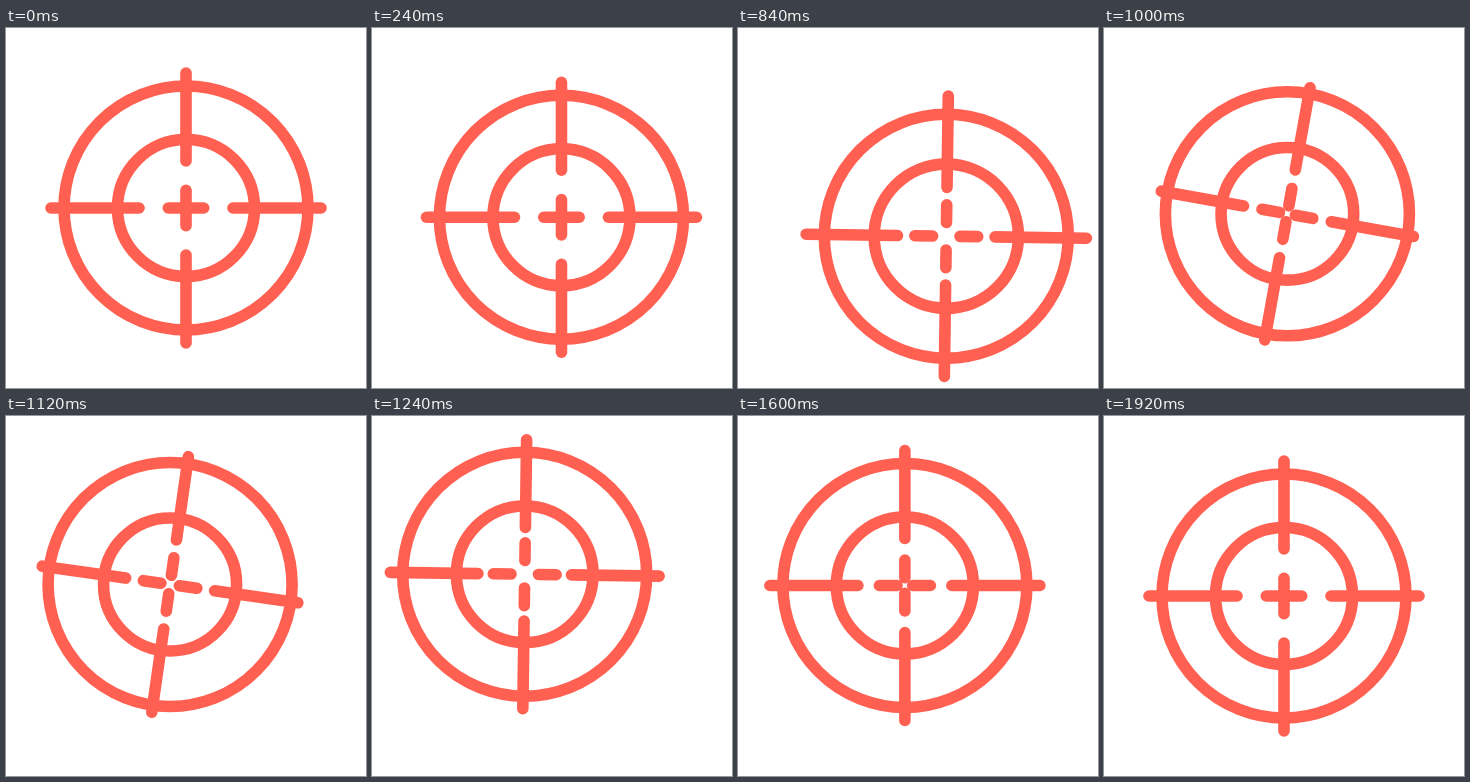
An HTML page with a canvas for the animation above (2 s loop, 360 by 360 pixels).

```html
<!DOCTYPE html>
<html lang="en">
<head>
<meta charset="utf-8">
<title>Crosshair</title>
<style>
html, body { margin: 0; width: 100%; height: 100%; overflow: hidden; background: #fff; }
canvas { display: block; width: 360px; height: 360px; }
</style>
</head>
<body>
<canvas id="stage"></canvas>
<script>
const LOOP = 2000, STEP = 40, SIZE = 360, MID = SIZE / 2;
const canvas = document.getElementById('stage');
const ctx = canvas.getContext('2d');
const ratio = window.devicePixelRatio || 1;
canvas.width = canvas.height = SIZE * ratio;

// Smooth progress from 0 to 1 between two times
function ease(t, from, to) {
  const s = Math.min(1, Math.max(0, (t - from) / (to - from)));
  return s * s * (3 - 2 * s);
}

function circle(r) {
  ctx.beginPath();
  ctx.arc(0, 0, r, 0, Math.PI * 2);
  ctx.stroke();
}

function spoke(from, to) {
  ctx.beginPath();
  ctx.moveTo(from, 0);
  ctx.lineTo(to, 0);
  ctx.stroke();
}

function pose(t) {
  const out = ease(t, 80, 560);
  const cross = ease(t, 715, 1275);
  const back = ease(t, 1350, 1830);
  const swell = ease(t, 720, 800) - ease(t, 800, 1040);
  const twist = ease(t, 800, 1040) - ease(t, 1040, 1280);
  const open = ease(t, 400, 690) - ease(t, 1320, 1920);
  return {
    x: MID + 36.5 * out - 64.5 * cross + 28 * back,
    y: MID + 35.6 * out - 58 * cross + 22.4 * back,
    angle: 11 * twist * Math.PI / 180,
    gap: 14.2 * open - 6.6 * twist,
    reach: 1 + 0.046 * swell - 0.059 * twist,
    ring: 1 + 0.06 * swell - 0.039 * twist
  };
}

function draw(t) {
  const { x, y, angle, gap, reach, ring } = pose(t);
  ctx.setTransform(ratio, 0, 0, ratio, 0, 0);
  ctx.fillStyle = '#fff';
  ctx.fillRect(0, 0, SIZE, SIZE);
  ctx.strokeStyle = '#ff6051';
  ctx.lineWidth = 11.6;
  ctx.lineCap = 'round';

  ctx.translate(x, y);
  circle(122);
  circle(68.5 * ring);

  ctx.rotate(angle);
  for (let i = 0; i < 4; i++) {
    spoke(47 * reach, 135 * reach);
    spoke(gap, gap + 17.7);
    ctx.rotate(Math.PI / 2);
  }
}

const start = performance.now();
function tick() {
  const t = (performance.now() - start) % LOOP;
  draw(Math.floor(t / STEP) * STEP);
  requestAnimationFrame(tick);
}
tick();
</script>
</body>
</html>
```
